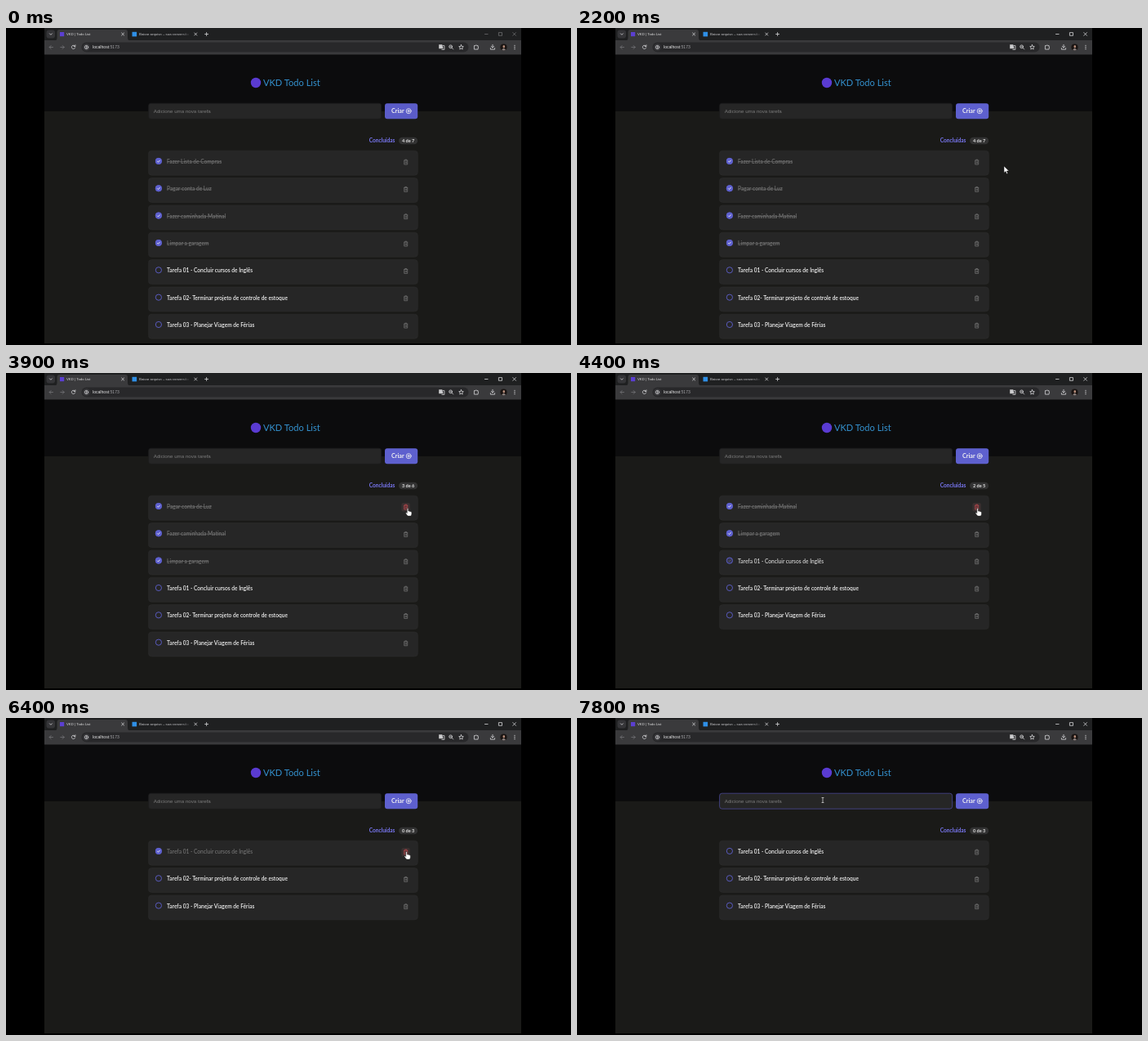
Write an HTML page that moves like this. It is 692 px wide and 388 px high and loops after 8000 ms.

```html
<!DOCTYPE html>
<html lang="pt-BR">
<head>
<meta charset="utf-8">
<title>Todo List</title>
<style>
  html, body { margin: 0; width: 100%; height: 100%; overflow: hidden; background: #000; }
  svg { display: block; }
  text { white-space: pre; }
  .app { font-family: Lato, "Open Sans", sans-serif; }
  .ui { font-family: "Liberation Sans", Arial, sans-serif; }
  .line { fill: none; stroke: #d6d6d8; stroke-width: .8; stroke-linecap: round; stroke-linejoin: round; }
  .dim { stroke: #747478; }
  .task { font-size: 6.6px; font-weight: 600; }
  .card { fill: #262626; stroke: #303030; stroke-width: .45; }
</style>
</head>
<body>
<svg width="692" height="388" viewBox="0 0 692 388">
  <rect width="692" height="388" fill="#000"/>
  <rect x="47" width="584" height="386" fill="#1a1a18"/>
  <rect x="47" y="32" width="584" height="70" fill="#0c0c0d"/>

  <!-- browser bar -->
  <g class="ui">
    <rect x="47" width="584" height="16" fill="#1f2021"/>
    <rect x="47" y="15" width="584" height="17.5" fill="#3a3a3c"/>
    <rect x="49.5" y="2.5" width="10.5" height="10" rx="3" fill="#353538"/>
    <path class="line" d="M53.4 6.8l1.5 1.5 1.5-1.5"/>
    <path d="M59 15.5q3.5 0 3.5-3.5V5q0-3 3-3H146q3 0 3 3v7q0 3.5 3.5 3.5z" fill="#3a3a3c"/>
    <rect x="66" y="5" width="5.2" height="5.2" fill="#5b3fd0"/>
    <text x="74" y="9.2" font-size="4.3" fill="#dedee0">VKD | Todo List</text>
    <rect x="154.5" y="4.8" width="5.6" height="5.6" fill="#2f8fe6"/>
    <text x="163" y="9.2" font-size="4.35" fill="url(#fade)">Baixar arquivo – sua conversão</text>
    <path class="line" d="M141.6 6l3 3m0-3l-3 3M230.8 6l3 3m0-3l-3 3M243.6 7.5h4m-2-2v4"/>
    <g id="win" class="line">
      <path d="M586.5 7.5h3.6M603.8 5.6h3.7v3.7h-3.7zM620.8 5.6l3.7 3.7m0-3.7l-3.7 3.7"/>
    </g>
    <path class="line dim" d="M57.5 23.5h-4.4m2-2l-2 2 2 2M66.8 23.5h4.4m-2-2l2 2-2 2"/>
    <path class="line" d="M84.5 22.3a2.2 2.2 0 1 0 .2 1.7M84.9 20.8v1.7h-1.7"/>
    <rect x="92.5" y="17.6" width="474" height="11.8" rx="5.9" fill="#28282a"/>
    <circle cx="98.5" cy="23.5" r="4.3" fill="#39393c"/>
    <circle class="line" cx="98.5" cy="23.5" r="2.1"/>
    <path class="line" d="M98.5 23.4v1M98.5 22.4v.1"/>
    <text x="106" y="25.3" font-size="5.1" fill="#e8e8ea">localhost<tspan fill="#a4a4a8">:5173</tspan></text>
    <path d="M530.2 20.2h4l1.4 5h-5.4z" fill="#c8c8ca"/>
    <path class="line" d="M535 21.6h1.9v4.8h-3M531.6 22.7h1.4"/>
    <circle class="line" cx="544.6" cy="22.8" r="1.9"/>
    <path class="line" d="M546 24.3l1.7 1.7M543.8 22.8h1.6"/>
    <path class="line" d="M557.5 20.6l.8 1.9 2 .2-1.5 1.4.4 2-1.7-1-1.7 1 .4-2-1.5-1.4 2-.2z"/>
    <path class="line" d="M573.8 21.6h1.4q.7-1.8 1.4 0h1.5v1.6q1.8.6 0 1.4v1.5h-4.3z"/>
    <path class="line" d="M596 20.4v3.6m-1.7-1.6l1.7 1.7 1.7-1.7M593.4 24.6v1.6h5.2v-1.6"/>
    <circle cx="609.5" cy="23.5" r="4.1" fill="#1b1513"/>
    <ellipse cx="609.8" cy="22.8" rx="1.3" ry="1.8" fill="#b98f7c"/>
    <path d="M607.2 26.8q2.4-3.4 4.8 0q-2.4 1.6-4.8 0z" fill="#8d8482"/>
    <g fill="#d6d6d8"><circle cx="623" cy="21.3" r=".65"/><circle cx="623" cy="23.5" r=".65"/><circle cx="623" cy="25.7" r=".65"/></g>
  </g>

  <!-- page header -->
  <g class="app">
    <circle cx="306" cy="67" r="6.2" fill="#5a3bd2"/>
    <text x="315" y="71" font-size="11.1" fill="#3492d0">VKD Todo List</text>
    <rect id="field" x="174.6" y="92.2" width="285" height="19" rx="3" fill="#262626" stroke-width=".7"/>
    <text class="ui" x="180.8" y="103.8" font-size="6.18" fill="#7c7c7c">Adicione uma nova tarefa</text>
    <path id="caret" d="M180.9 98v7.2" stroke="#f0f0f0" stroke-width=".7"/>
    <rect id="button" x="464" y="92.2" width="40.2" height="19" rx="3"/>
    <text x="472" y="104" font-size="7.2" font-weight="700" fill="#f2f2f2">Criar</text>
    <g class="line" style="stroke:#f2f2f2"><circle cx="493.2" cy="101.7" r="3"/><path d="M491.7 101.7h3m-1.5-1.5v3"/></g>
    <text x="444.8" y="140.3" font-size="6.5" font-weight="700" fill="#7a78f4">Concluídas</text>
    <rect x="481" y="133.8" width="23.2" height="8.4" rx="4.2" fill="#333"/>
    <text id="count" x="492.6" y="140" font-size="5.6" font-weight="700" text-anchor="middle" fill="#e4e4e4"></text>
    <g id="list"></g>
  </g>

  <g id="cursor">
    <path id="arrow" d="M0 0v8.4l2-1.8 1.3 3 1.4-.6-1.3-2.9h2.7z" fill="#fff" stroke="#111" stroke-width=".5"/>
    <path id="hand" d="M-.8.6Q0-.5.8.6V3.6q1.1-.6 1.5.3 1-.5 1.4.4 1.2-.3 1.2.9V7Q4.8 9 3.6 9.6H.2Q-1.4 8-2.5 6q0-1.1 1-.8l.7.8z" fill="#fff" stroke="#111" stroke-width=".5" stroke-linejoin="round"/>
    <path id="beam" d="M-1.4-3H1.4M0-3V3M-1.4 3H1.4" fill="none" stroke="#e8e8e8" stroke-width=".7"/>
  </g>
  <defs>
    <linearGradient id="fade" gradientUnits="userSpaceOnUse" x1="214" x2="226">
      <stop stop-color="#c6c6c9"/><stop offset="1" stop-color="#1f2021"/>
    </linearGradient>
  </defs>
</svg>
<script>
const LOOP = 8000, STEP = 100;
const tasks = [
  'Fazer Lista de Compras', 'Pagar conta de Luz', 'Fazer caminhada Matinal', 'Limpar a garagem',
  'Tarefa 01 - Concluir cursos de Inglês',
  'Tarefa 02- Terminar projeto de controle de estoque',
  'Tarefa 03 - Planejar Viagem de Férias'
];
const removals = [3200, 4100, 5100, 6400];
// time, x, y of the pointer's hot spot
const path = [
  [1700, 560, 130], [2300, 520, 172], [2800, 494, 162], [3000, 493, 162],
  [3200, 492, 163.5], [3900, 492, 165.5], [4200, 491, 165.5], [5000, 488.5, 165.5],
  [5900, 488.5, 165.5], [6300, 490.5, 163.5], [6500, 490.5, 163.5], [6800, 440, 120],
  [7200, 291, 104], [7500, 291, 104], [7600, 301, 100.5]
];

const $ = id => document.getElementById(id);
const ramp = (t, a, b) => Math.min(1, Math.max(0, (t - a) / (b - a)));
const mix = (a, b, p) => `rgb(${a.map((v, i) => Math.round(v + (b[i] - v) * p))})`;
const show = (el, on) => el.setAttribute('visibility', on ? 'visible' : 'hidden');

const rows = tasks.map((_, i) => {
  const g = document.createElementNS('http://www.w3.org/2000/svg', 'g');
  g.setAttribute('transform', `translate(174.4 ${150.2 + i * 33.35})`);
  g.innerHTML = `
    <rect class="card" width="330" height="30" rx="4"/>
    <circle cx="12.5" cy="12.7" r="3.6" fill="none" stroke="#5e60ce" stroke-width=".9"/>
    <g class="mark"><circle cx="12.5" cy="12.7" r="4" fill="#5e60ce"/>
      <path d="M10.8 12.8l1.2 1.2 2.2-2.4" fill="none" stroke="#f2f2f2" stroke-width=".9"/></g>
    <text class="task" x="22.7" y="15.9"></text>
    <rect class="halo" x="310" y="8.8" width="10.4" height="10.4" rx="2" fill="#3a3030" opacity="0"/>
    <path class="bin" d="M312.8 11.9h5M314.3 11.7v-.8h2v.8M313.3 12v4.8h4V12M314.7 13.2v2.4M315.9 13.2v2.4"
      fill="none" stroke="#808080" stroke-width=".65"/>`;
  $('list').append(g);
  const part = s => g.querySelector(s);
  return { g, mark: part('.mark'), text: part('text'), halo: part('.halo'), bin: part('.bin') };
});

function drawList(t) {
  const gone = removals.filter(r => t >= r).length;
  const left = tasks.slice(gone), done = 4 - gone;
  const fading = gone ? 1 - ramp(t, removals[gone - 1], removals[gone - 1] + 400) : 0;
  $('count').textContent = `${done} de ${left.length}`;
  rows.forEach((row, i) => {
    row.g.style.display = i < left.length ? '' : 'none';
    const p = i < done ? 1 : i === done ? fading : 0;
    row.mark.setAttribute('opacity', p);
    row.text.textContent = left[i] || '';
    row.text.setAttribute('fill', mix([242, 242, 242], [112, 112, 112], p));
    row.text.setAttribute('text-decoration', i < done ? 'line-through' : 'none');
  });
  const hover = ramp(t, 2800, 3100) * (1 - ramp(t, 6500, 6700));
  rows[0].halo.setAttribute('opacity', hover);
  rows[0].bin.setAttribute('stroke', mix([128, 128, 128], [214, 76, 84], hover));
}

function drawCursor(t) {
  show($('cursor'), t >= path[0][0]);
  const n = path.findIndex(k => k[0] > t);
  const b = path[n < 0 ? path.length - 1 : n], a = n > 0 ? path[n - 1] : b;
  const p = a === b ? 0 : ramp(t, a[0], b[0]), s = p * p * (3 - 2 * p);
  const x = a[1] + (b[1] - a[1]) * s, y = a[2] + (b[2] - a[2]) * s;
  $('cursor').setAttribute('transform', `translate(${x} ${y})`);
  const hand = t >= 2800 && t <= 6500, beam = !hand && x < 460 && y < 112;
  const kind = hand ? 'hand' : beam ? 'beam' : 'arrow';
  for (const id of ['arrow', 'hand', 'beam']) $(id).style.display = id === kind ? '' : 'none';
}

function draw(t) {
  $('win').setAttribute('opacity', t < 1500 ? .42 : 1);
  $('button').setAttribute('fill', mix([91, 92, 200], [94, 96, 206], ramp(t, 900, 1200)));
  const focus = t < 1700 ? .4 * ramp(t, 1400, 1500) : t < 3000 ? .4 * (1 - ramp(t, 1700, 2000)) : ramp(t, 7100, 7400);
  $('field').setAttribute('stroke', mix([30, 30, 31], [80, 78, 165], focus));
  show($('caret'), t >= 1500 && t < 1700 || t >= 7300 && t < 7800);
  drawList(t);
  drawCursor(t);
}

const start = performance.now();
function tick() {
  const t = (performance.now() - start) % LOOP;
  draw(Math.floor(t / STEP) * STEP);
  requestAnimationFrame(tick);
}
tick();
</script>
</body>
</html>
```
